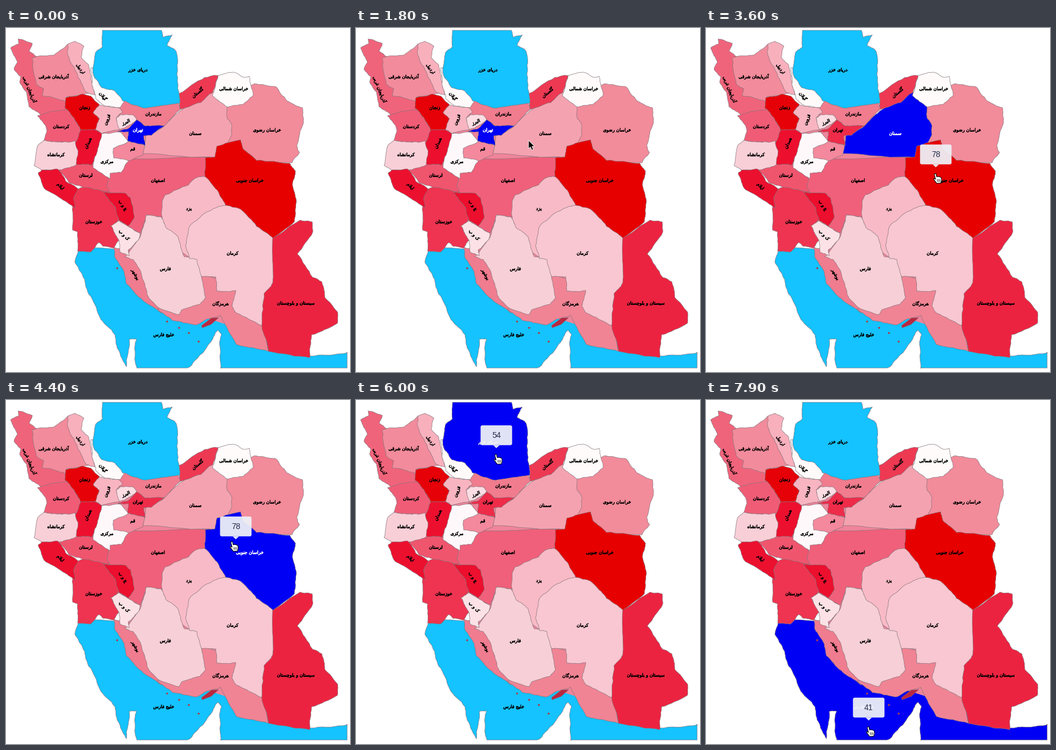
These frames come from a looping animation (600 by 600 pixels, 8000 ms). A matplotlib script:

```python
import numpy as np
import matplotlib.pyplot as plt
import matplotlib.patheffects as effects
from matplotlib.animation import FuncAnimation
from matplotlib.patches import Circle, FancyBboxPatch, Polygon
from matplotlib.transforms import Affine2D

SIZE, DPI, STEP, LOOP = 600, 100, 100, 8000
PX = 72 / DPI
BLUE, SEA, EDGE = "#0000f5", "#14c3ff", "#85747c"

fig = plt.figure(figsize=(SIZE / DPI, SIZE / DPI), dpi=DPI, facecolor="white")
ax = fig.add_axes([0, 0, 1, 1])
ax.set(xlim=(0, SIZE), ylim=(SIZE, 0))
ax.axis("off")
rng = np.random.default_rng(4)

# First presentation form of each Persian letter.
LIGATURE = "\ufefb"  # lam-alef
FORMS = {"آ": 0xFE81, "ا": 0xFE8D, "ب": 0xFE8F, "پ": 0xFB56, "ت": 0xFE95,
         "ج": 0xFE9D, "چ": 0xFB7A, "خ": 0xFEA5, "د": 0xFEA9, "ذ": 0xFEAB,
         "ر": 0xFEAD, "ز": 0xFEAF, "س": 0xFEB1, "ش": 0xFEB5, "ص": 0xFEB9,
         "ض": 0xFEBD, "غ": 0xFECD, "ف": 0xFED1, "ق": 0xFED5, "ک": 0xFB8E,
         "گ": 0xFB92, "ل": 0xFEDD, "م": 0xFEE1, "ن": 0xFEE5, "ه": 0xFEE9,
         "و": 0xFEED, "ی": 0xFBFC, LIGATURE: 0xFEFB}
NO_LEFT_JOIN = "آادذرزو" + LIGATURE


def shape(text):
    """Join Persian letters and put them in visual order."""
    text = " " + text.replace("لا", LIGATURE) + " "
    out = []
    for prev, c, after in zip(text, text[1:], text[2:]):
        if c in FORMS:
            joined = prev in FORMS and prev not in NO_LEFT_JOIN
            joins = after in FORMS and c not in NO_LEFT_JOIN
            c = chr(FORMS[c] + joined + 2 * joins)
        out.append(c)
    return "".join(reversed(out))


def ragged(pts, limit):
    """Roughen an outline by repeated midpoint displacement."""
    for _ in range(3):
        step = np.roll(pts, -1, axis=0) - pts
        length = np.hypot(*step.T)[:, None]
        normal = step[:, ::-1] * [1, -1] / length
        shift = np.minimum(0.08 * length, limit) * rng.uniform(-1, 1, length.shape)
        pts = np.stack([pts, pts + step / 2 + normal * shift], 1).reshape(-1, 2)
    return np.clip(pts, 4, [595, 593])


patches, labels, fills = {}, {}, {}


def area(key, color, name, x, y, angle, pts, limit=1.1):
    """Add a region; later regions cover the loose edges of earlier ones."""
    fills[key] = color
    patches[key] = ax.add_patch(Polygon(ragged(np.array(pts, float), limit), fc=color,
                                        ec=EDGE, lw=0.7 * PX, joinstyle="round", zorder=2))
    labels[key] = ax.text(x, y, shape(name), rotation=angle, ha="center", va="center",
                          rotation_mode="anchor", family="DejaVu Sans", size=7.8 * PX,
                          path_effects=[effects.withStroke(linewidth=0.5 * PX)], zorder=4)


area("gulf", SEA, "خلیج فارس", 275, 535, 0, [
    (126, 386), (200, 385), (260, 470), (370, 490), (460, 550), (530, 572), (588, 568),
    (600, 566), (600, 600), (374, 600), (373, 555), (376, 535), (370, 527), (354, 551),
    (337, 572), (308, 600), (230, 600), (225, 563), (228, 543), (215, 543), (210, 591),
    (198, 565), (190, 535), (163, 503), (144, 464), (133, 430), (120, 408)], 2.5)

# Backing that closes hairline gaps between regions.
ax.add_patch(Polygon([(60, 130), (290, 155), (375, 130), (480, 220), (480, 340), (455, 540),
                      (300, 490), (210, 390), (130, 270), (75, 200)], fc="#f0849a", zorder=2))

# North-west
area("azar_w", "#f0647b", "آذربایجان غربی", 41, 107, -68, [
    (21, 19), (46, 27), (40, 40), (70, 60), (110, 125), (105, 145), (64, 155), (40, 137),
    (36, 112), (24, 95), (26, 85), (14, 72), (20, 60), (8, 35), (22, 28)])
area("azar_e", "#f28b9b", "آذربایجان شرقی", 83, 85, 0, [
    (46, 52), (84, 47), (108, 28), (150, 112), (106, 120), (104, 128), (63, 118),
    (66, 106), (53, 98), (47, 70)])
area("ardabil", "#f8b0bd", "اردبیل", 130, 71, -55, [
    (108, 28), (120, 23), (136, 32), (131, 51), (144, 64), (150, 95), (155, 117),
    (140, 112), (126, 86), (114, 62), (107, 43)])
area("kurdistan", "#f05c76", "کردستان", 96, 172, 0, [
    (55, 153), (84, 145), (110, 143), (132, 180), (126, 200), (66, 196), (72, 175),
    (64, 164)])
area("lorestan", "#f0556e", "لرستان", 139, 257, 0, [
    (92, 247), (120, 237), (150, 237), (184, 262), (176, 275), (182, 287), (138, 280),
    (110, 270)])
area("kermanshah", "#f9cfd7", "کرمانشاه", 87, 221, 0, [
    (66, 196), (90, 199), (121, 197), (126, 215), (123, 238), (98, 247), (62, 248),
    (49, 240), (53, 215), (56, 204)])

# South-west and centre
area("esfahan", "#f0607a", "اصفهان", 265, 266, 0, [
    (176, 275), (182, 250), (215, 228), (365, 224), (365, 290), (280, 330), (245, 326),
    (234, 358), (215, 350), (180, 285)])
area("khuzestan", "#ee3450", "خوزستان", 153, 338, 0, [
    (124, 281), (138, 278), (182, 287), (197, 330), (186, 350), (197, 370), (188, 384),
    (170, 381), (162, 374), (147, 391), (125, 389), (125, 356), (116, 352), (118, 296)])
area("ilam", "#ec102f", "ایلام", 95, 276, -45, [
    (62, 248), (90, 246), (104, 267), (126, 281), (118, 296), (120, 314), (92, 295),
    (69, 282), (56, 253)])
area("markazi", "#fff8fa", "مرکزی", 176, 233, 0, [
    (165, 184), (200, 182), (215, 198), (214, 232), (201, 252), (182, 253), (181, 263),
    (152, 244), (155, 205)])
area("hamadan", "#ed102e", "همدان", 143, 201, 65, [
    (130, 178), (156, 177), (167, 184), (160, 210), (150, 239), (123, 238), (126, 215),
    (121, 200)])
area("qom", "#f4889c", "قم", 221, 211, 0, [
    (187, 210), (213, 198), (242, 204), (238, 222), (214, 232), (188, 227)])
area("chb", "#ec0f2e", "چ و ب", 204, 309, -55, [
    (170, 287), (208, 288), (217, 296), (224, 330), (213, 346), (197, 336), (191, 313)])

# North
area("mazandaran", "#f07c8e", "مازندران", 257, 150, 0, [
    (195, 125), (300, 125), (304, 142), (276, 171), (243, 171), (222, 155), (197, 151)])
area("gilan", "#fffafa", "گیلان", 169, 119, -52, [
    (148, 69), (160, 72), (210, 125), (199, 139), (172, 136), (157, 124), (150, 100)])
area("zanjan", "#e60008", "زنجان", 137, 139, 3, [
    (104, 122), (133, 115), (148, 119), (163, 134), (152, 148), (163, 158), (156, 177),
    (130, 178), (118, 156), (103, 140)])
area("qazvin", "#f8b5c1", "قزوین", 176, 160, 66, [
    (152, 148), (163, 134), (197, 139), (203, 147), (192, 157), (198, 177), (167, 184),
    (156, 177), (163, 158)])
area("razavi", "#f28b9a", "خراسان رضوی", 455, 178, 0, [
    (434, 97), (470, 102), (490, 127), (517, 139), (519, 165), (507, 205), (512, 217),
    (499, 235), (400, 235), (370, 190), (375, 125)])
area("semnan", "#f5a2b0", "سمنان", 330, 184, 0, [
    (276, 171), (303, 145), (360, 112), (386, 135), (386, 158), (394, 170), (394, 186),
    (370, 226), (239, 219), (244, 188)])
area("khorasan_n", "#fffbfb", "خراسان شمالی", 397, 106, 0, [
    (370, 83), (397, 77), (414, 86), (424, 84), (431, 118), (414, 133), (386, 138),
    (360, 118)])
area("golestan", "#ee3953", "گلستان", 334, 113, 40, [
    (303, 131), (302, 114), (347, 86), (370, 83), (361, 112), (340, 130), (304, 142)])
area("caspian", SEA, "دریای خزر", 230, 73, 0, [
    (168, 0), (270, 0), (274, 16), (290, 12), (281, 30), (294, 37), (299, 50), (298, 80),
    (303, 131), (243, 140), (203, 127), (190, 110), (167, 104), (154, 86), (151, 72),
    (156, 43), (168, 33)])
area("alborz", "#fbdde3", "البرز", 209, 164, 22, [
    (192, 157), (200, 151), (222, 152), (228, 160), (214, 170), (198, 177)])
area("tehran", "#ee2b49", "تهران", 230, 178, 0, [
    (195, 180), (212, 176), (228, 160), (243, 171), (276, 171), (254, 187), (240, 188),
    (243, 205), (212, 197), (214, 181)])

# South and east
area("yazd", "#f8bac6", "یزد", 319, 315, 0, [
    (347, 259), (330, 262), (318, 274), (278, 291), (273, 300), (272, 328), (290, 380),
    (330, 405), (390, 320), (375, 285)])
area("bushehr", "#f07c8f", "بوشهر", 226, 430, -62, [
    (188, 383), (200, 385), (230, 395), (280, 490), (270, 497), (236, 472), (210, 446),
    (206, 425), (190, 400)])
area("hormozgan", "#f08494", "هرمزگان", 374, 481, 0, [
    (264, 490), (300, 480), (345, 430), (400, 450), (450, 515), (458, 564), (402, 552),
    (384, 520), (374, 501), (350, 508), (330, 518), (290, 510)])
area("fars", "#f7cfd6", "فارس", 278, 420, 0, [
    (245, 326), (271, 330), (279, 348), (300, 364), (311, 399), (335, 403), (342, 440),
    (348, 470), (338, 482), (306, 492), (302, 500), (265, 487), (246, 465), (236, 428),
    (222, 404), (207, 399), (232, 368)])
area("kb", "#fce2e6", "ک و ب", 206, 361, -45, [
    (183, 345), (197, 336), (234, 358), (232, 368), (213, 387), (215, 397), (199, 391),
    (197, 370)])
area("kerman", "#f8c7d1", "کرمان", 395, 393, 0, [
    (446, 519), (402, 497), (394, 485), (401, 458), (368, 459), (366, 434), (342, 434),
    (333, 404), (320, 402), (313, 380), (320, 346), (350, 321), (372, 311), (400, 306),
    (470, 362), (470, 450)])
area("khorasan_s", "#e60000", "خراسان جنوبی", 425, 266, 0, [
    (348, 226), (364, 225), (368, 206), (409, 195), (413, 210), (437, 231), (495, 236),
    (505, 250), (500, 270), (506, 298), (503, 338), (466, 367), (437, 346), (409, 316),
    (383, 309), (371, 287), (347, 259)])
area("sistan", "#ec2340", "سیستان و بلوچستان", 505, 480, 0, [
    (465, 367), (513, 335), (534, 338), (535, 356), (508, 394), (535, 435), (551, 443),
    (556, 470), (578, 495), (578, 515), (533, 535), (530, 575), (458, 564), (446, 519),
    (450, 463), (465, 445)])
patches["gulf"].set_zorder(1)

ISLAND = dict(fc="#b82841", ec=EDGE, lw=0.4 * PX, zorder=3)
ax.add_patch(Polygon([(341, 519), (358, 506), (371, 505), (358, 517), (342, 523)], **ISLAND))
for spot in [(281, 512), (302, 523), (319, 532), (336, 547), (194, 419)]:
    ax.add_patch(Circle(spot, 1.5, **ISLAND))

# Tooltip, drawn around its centre.
TIP = dict(fc="#edf0f6", lw=0, zorder=10)
bubble = [
    ax.add_patch(FancyBboxPatch((-27.5, -17.3), 55, 34.6, **TIP,
                                boxstyle="round,pad=0,rounding_size=3")),
    ax.add_patch(Polygon([(-5.5, 17.3), (5.5, 17.3), (0, 22.5)], **TIP))]
value = ax.text(0, 0, "", ha="center", va="center", family="Liberation Sans",
                size=14 * PX, color="#252d48", zorder=11)

# Cursors, drawn from their hot spot.
arrow = [ax.add_patch(Polygon([(0, 0), (0, 14.5), (3.3, 11.6), (5.8, 17), (8.3, 16),
                               (5.9, 10.6), (10.3, 10.3)], fc="black", ec="white",
                              lw=0.8 * PX, zorder=12))]
hand = [ax.add_patch(Polygon([(-1, 0), (1, 0), (2.3, 5.6), (4.5, 5), (8, 5.7), (10.5, 7.3),
                              (11, 12), (9.5, 16.5), (2.5, 17), (-3.3, 9.3), (-2, 8.2),
                              (0.4, 10), (-1.6, 2)], fc="white", ec="black",
                             lw=PX, zorder=12))]
for x in (3.5, 5.8, 8):
    hand += ax.plot([x, x + 0.4], [10, 14], color="black", lw=0.8 * PX, zorder=13)

PATH = [(100, 612, 318), (900, 437, 250), (1100, 301, 196), (1800, 301, 196),
        (2100, 306, 197), (2900, 306, 197), (3600, 400, 254), (4200, 400, 254),
        (4400, 394, 247), (4700, 394, 247), (5200, 244, 95), (6400, 244, 95),
        (7000, 283, 570), (LOOP, 283, 570)]
TIMES, XS, YS = np.array(PATH, float).T
CLICKS = [(0, "tehran"), (2300, "semnan"), (3800, "khorasan_s"), (5800, "caspian"),
          (7800, "gulf")]
# Start, time it comes to rest, start of fade-out, value.
TIPS = [(1850, 2100, 2850, "23"), (3250, 3600, 4700, "78"), (5000, 5200, 6350, "54"),
        (6950, 7000, 9000, "41")]


def cursor_at(t):
    k = np.clip(np.searchsorted(TIMES, t) - 1, 0, len(TIMES) - 2)
    u = np.clip((t - TIMES[k]) / (TIMES[k + 1] - TIMES[k]), 0, 1)
    u = u * u * (3 - 2 * u)
    return XS[k] + (XS[k + 1] - XS[k]) * u, YS[k] + (YS[k + 1] - YS[k]) * u


def tip_at(t):
    """Text, opacity and centre of the tooltip."""
    for start, rest, stop, text in TIPS:
        if start <= t < stop + 150:
            alpha = min(1, (t - start) / 200, 1 - (t - stop) / 150)
            x, y = cursor_at(min(t, rest))
            return text, alpha, x + 0.8, y - 33.5 + 3 * (1 - alpha)
    return "", 0, 0, 0


def place(parts, x, y):
    for p in parts:
        p.set_transform(Affine2D().translate(x, y) + ax.transData)


def draw(i):
    t = i * STEP
    chosen = [key for start, key in CLICKS if t >= start][-1]
    for key, patch in patches.items():
        patch.set_facecolor(BLUE if key == chosen else fills[key])
        labels[key].set_color("white" if key == chosen else "black")

    pointing = t >= 1900
    for parts, shown in ((arrow, not pointing), (hand, pointing)):
        place(parts, *cursor_at(t))
        for p in parts:
            p.set_visible(shown)

    text, alpha, x, y = tip_at(t)
    place(bubble, x, y)
    for p in bubble:
        p.set_alpha(0.95 * alpha)
    value.set_position((x, y + 0.5))
    value.set_text(text)
    value.set_alpha(alpha)
    return []


anim = FuncAnimation(fig, draw, frames=LOOP // STEP, interval=STEP, repeat=True,
                     repeat_delay=0, blit=False)
plt.show()
```
